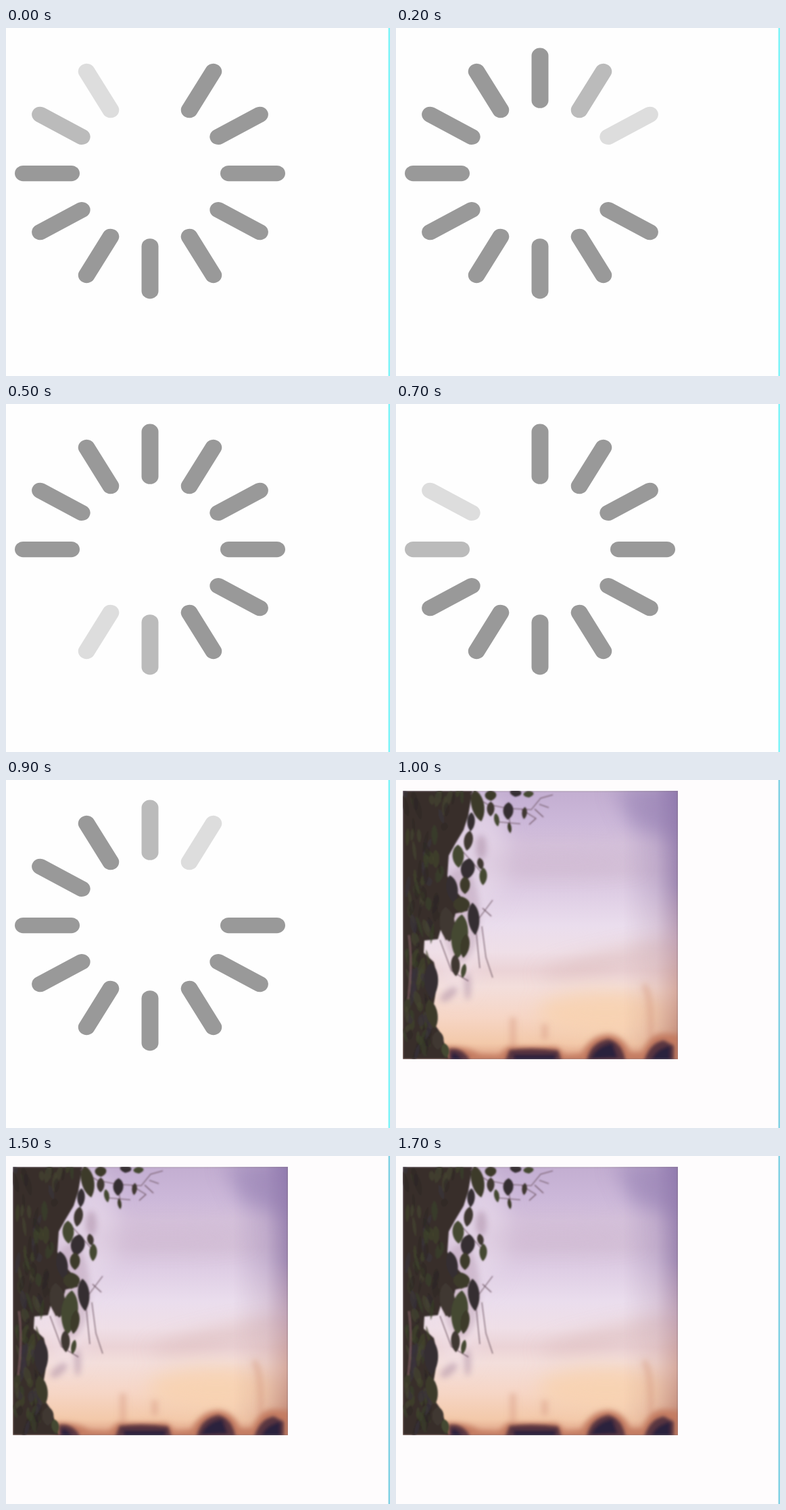
Recreate the animation shown at these times as an HTML page. Size 568 by 516 pixels, loop 1800 ms.

```html
<!DOCTYPE html>
<html lang="en">
<head>
<meta charset="utf-8">
<title>Loading</title>
<style>
  html, body { margin: 0; width: 100%; height: 100%; overflow: hidden; background: #fefefe; }
  svg { display: block; }
</style>
</head>
<body>
<svg id="stage" width="568" height="516" viewBox="0 0 568 516">
  <defs>
    <linearGradient id="sky" x1="0" y1="0" x2="0" y2="1">
      <stop offset="0" stop-color="#c3aed1"/>
      <stop offset=".12" stop-color="#ccb8d9"/>
      <stop offset=".2" stop-color="#d4c0da"/>
      <stop offset=".3" stop-color="#d5c1d9"/>
      <stop offset=".38" stop-color="#decde4"/>
      <stop offset=".5" stop-color="#eadded"/>
      <stop offset=".6" stop-color="#efdfe7"/>
      <stop offset=".67" stop-color="#ebd3d6"/>
      <stop offset=".73" stop-color="#f3dedb"/>
      <stop offset=".84" stop-color="#f6d6c6"/>
      <stop offset=".94" stop-color="#f3c9aa"/>
      <stop offset="1" stop-color="#dea084"/>
    </linearGradient>
    <linearGradient id="edge" x1="0" y1="0" x2="0" y2="1">
      <stop offset="0" stop-color="#8a73aa"/>
      <stop offset=".35" stop-color="#947ca9"/>
      <stop offset=".55" stop-color="#b999ad"/>
      <stop offset=".75" stop-color="#cf9f92"/>
      <stop offset="1" stop-color="#b57862"/>
    </linearGradient>
    <linearGradient id="fade">
      <stop offset="0" stop-color="#fff" stop-opacity="0"/>
      <stop offset=".6" stop-color="#fff" stop-opacity=".3"/>
      <stop offset="1" stop-color="#fff" stop-opacity=".85"/>
    </linearGradient>
    <mask id="right"><rect x="336" y="16" width="81" height="398" fill="url(#fade)"/></mask>
    <filter id="soft" x="-50%" y="-50%" width="200%" height="200%"><feGaussianBlur stdDeviation="4"/></filter>
    <filter id="haze" x="-50%" y="-100%" width="200%" height="300%"><feGaussianBlur stdDeviation="14"/></filter>
    <filter id="blur" x="-20%" y="-50%" width="140%" height="200%"><feGaussianBlur stdDeviation="2.5"/></filter>
    <filter id="leafy"><feGaussianBlur stdDeviation="1.1"/></filter>
  </defs>

  <rect id="paper" width="568" height="516"/>
  <rect id="rule" x="565.5" width="2.5" height="516"/>

  <g id="spinner" transform="translate(213 215.5) scale(1 .93)" stroke-width="25" stroke-linecap="round"/>

  <svg id="photo" x="10.5" y="16.5" width="406" height="397" viewBox="10.5 16.5 406 397">
    <rect x="10" y="16" width="407" height="398" fill="url(#sky)"/>
    <g filter="url(#haze)">
      <ellipse cx="120" cy="110" rx="45" ry="90" fill="#e6d8e8" opacity=".7"/>
      <path d="M320 10H420V90L345 65Z" fill="#9f8bba" opacity=".65"/>
      <ellipse cx="240" cy="122" rx="120" ry="12" fill="#ceb6cf" opacity=".45"/>
      <ellipse cx="330" cy="264" rx="120" ry="11" fill="#d9b5b6" opacity=".65" transform="rotate(-12 330 264)"/>
      <ellipse cx="310" cy="345" rx="100" ry="32" fill="#f8d3ae" opacity=".8"/>
      <ellipse cx="90" cy="250" rx="30" ry="70" fill="#f1e2ea" opacity=".5"/>
    </g>
    <rect x="336" y="16" width="81" height="398" fill="url(#edge)" mask="url(#right)"/>

    <g filter="url(#soft)">
      <path d="M173 352V400M220 362V385M366 304Q378 315 377 385" fill="none" stroke="#d79b84" stroke-width="9" opacity=".5"/>
      <path d="M70 420V397Q95 392 125 407L152 408L165 396H238L250 408L274 406Q288 378 314 377Q338 380 346 404L364 404Q375 376 396 376L422 378V420Z" fill="#c27a60"/>
    </g>
    <g filter="url(#blur)" fill="#58363f">
      <path d="M78 420V399Q95 395 108 412V420ZM160 420L168 400Q205 396 240 401L246 420ZM281 420Q286 389 314 384Q336 389 340 420ZM366 420Q374 390 396 386L411 394V420Z"/>
      <path d="M82 420V405Q92 402 100 420ZM174 420V407H236V420ZM288 414Q296 394 320 390L328 412ZM376 420Q382 398 406 394V420Z" fill="#29233e"/>
    </g>

    <g filter="url(#soft)" fill="#a3829b" opacity=".45">
      <ellipse cx="126" cy="100" rx="8" ry="18"/>
      <ellipse cx="78" cy="318" rx="15" ry="7" transform="rotate(-40 78 318)"/>
      <ellipse cx="106" cy="306" rx="5" ry="20"/>
      <ellipse cx="96" cy="200" rx="28" ry="70" opacity=".7"/>
    </g>
    <g filter="url(#leafy)">
      <path d="M10 16H113L107 52L100 74L88 94L78 112L76 142L84 160L95 172L109 182L106 194L88 198L80 228L74 238L66 222L62 236L42 238L41 256L56 270L62 296L56 332L57 362L68 378L78 414H10Z" fill="#382f2a"/>
      <g id="texture"/>
      <path d="M19 230Q25 270 18 325" fill="none" stroke="#8c646c" stroke-width="3" opacity=".6"/>
      <path d="M110 20L135 36L165 42L200 44L214 27L232 22M186 44L207 57L197 66M150 62L184 65M212 36L226 41M166 44L170 76M205 43L218 55M98 105L129 140M122 206L143 178M128 190L141 202M117 210L124 279M127 217L133 263L143 293M65 237L82 283L107 298" fill="none" stroke="#6b5360" stroke-width="1.1"/>
      <g id="leaves"/>
    </g>
    <rect x="11" y="17" width="405" height="396" fill="none" stroke="#80707c" stroke-opacity=".4"/>
  </svg>
</svg>

<script>
const TICK = 100, TICKS = 18, SPIN_TICKS = 10, SPOKES = 12;
const TONES = ['none', '#dddddd', '#bbbbbb'], GREY = '#999999';
const $ = id => document.getElementById(id);

function add(parent, tag, attrs) {
  const el = document.createElementNS('http://www.w3.org/2000/svg', tag);
  for (const key in attrs) el.setAttribute(key, attrs[key]);
  return parent.appendChild(el);
}

function leaf(parent, x, y, w, h, turn, fill, opacity = 1) {
  add(parent, 'path', {
    d: `M0 ${-h}C${w * 1.3} ${-h * .6} ${w * 1.2} ${h * .5} 0 ${h}C${-w * 1.2} ${h * .5} ${-w * 1.3} ${-h * .6} 0 ${-h}`,
    transform: `translate(${x} ${y}) rotate(${turn})`, fill, opacity
  });
}

let seed = 7;
const rand = () => (seed = seed * 16807 % 2147483647) / 2147483647;

// Mottled leaves inside the dark mass
const greens = ['#40432b', '#2d2825', '#3b323d', '#3b4029', '#2e2828', '#464631'];
for (let i = 0; i < 130; i++) {
  const y = 18 + rand() * 392;
  const reach = y < 80 ? 85 : y < 230 ? 52 : y < 265 ? 20 : 38;
  leaf($('texture'), 13 + rand() * reach, y, 2 + rand() * 4, 6 + rand() * 12,
    rand() * 40 - 20, greens[i % greens.length], .65);
}

// x, y, half width, half height
const hanging = [
  [121, 38, 10, 24], [140, 43, 6, 11], [149, 59, 4, 10], [166, 46, 8, 13],
  [168, 71, 3, 8], [190, 49, 4, 9], [196, 21, 8, 5], [177, 19, 9, 6],
  [140, 23, 9, 8], [107, 90, 7, 15], [92, 113, 9, 17], [106, 132, 11, 16],
  [102, 156, 8, 13], [125, 124, 5, 9], [129, 143, 6, 13], [83, 162, 9, 21],
  [97, 185, 13, 12], [76, 214, 12, 26], [94, 232, 13, 33], [115, 206, 9, 24],
  [102, 246, 7, 18], [88, 275, 7, 16], [100, 283, 4, 11], [52, 298, 11, 27],
  [53, 347, 9, 22], [62, 386, 9, 14], [73, 401, 6, 11], [111, 62, 6, 14]
];
hanging.forEach(([x, y, w, h], i) =>
  leaf($('leaves'), x, y, w, h, i * 37 % 24 - 12, ['#3c3a2c', '#403832', '#444830', '#352e30'][i % 4]));

const spokes = Array.from({ length: SPOKES }, (_, i) =>
  add($('spinner'), 'line', { y1: -187.5, y2: -116.5, transform: `rotate(${i * 360 / SPOKES})` }));

function draw(ms) {
  const tick = Math.floor(ms / TICK) % TICKS;
  const spinning = tick < SPIN_TICKS;
  $('spinner').style.display = spinning ? '' : 'none';
  $('photo').style.display = spinning ? 'none' : '';
  $('paper').setAttribute('fill', spinning ? '#fefefe' : '#fefcfd');
  $('rule').setAttribute('fill', spinning ? '#7ff4f7' : '#83d2e3');
  const head = Math.round(tick * 1.5);
  spokes.forEach((spoke, i) => {
    const behind = (head - i + 2 * SPOKES) % SPOKES;
    spoke.setAttribute('stroke', TONES[behind] || GREY);
  });
}

const start = performance.now();
function loop() {
  draw(performance.now() - start);
  requestAnimationFrame(loop);
}
loop();
</script>
</body>
</html>
```
